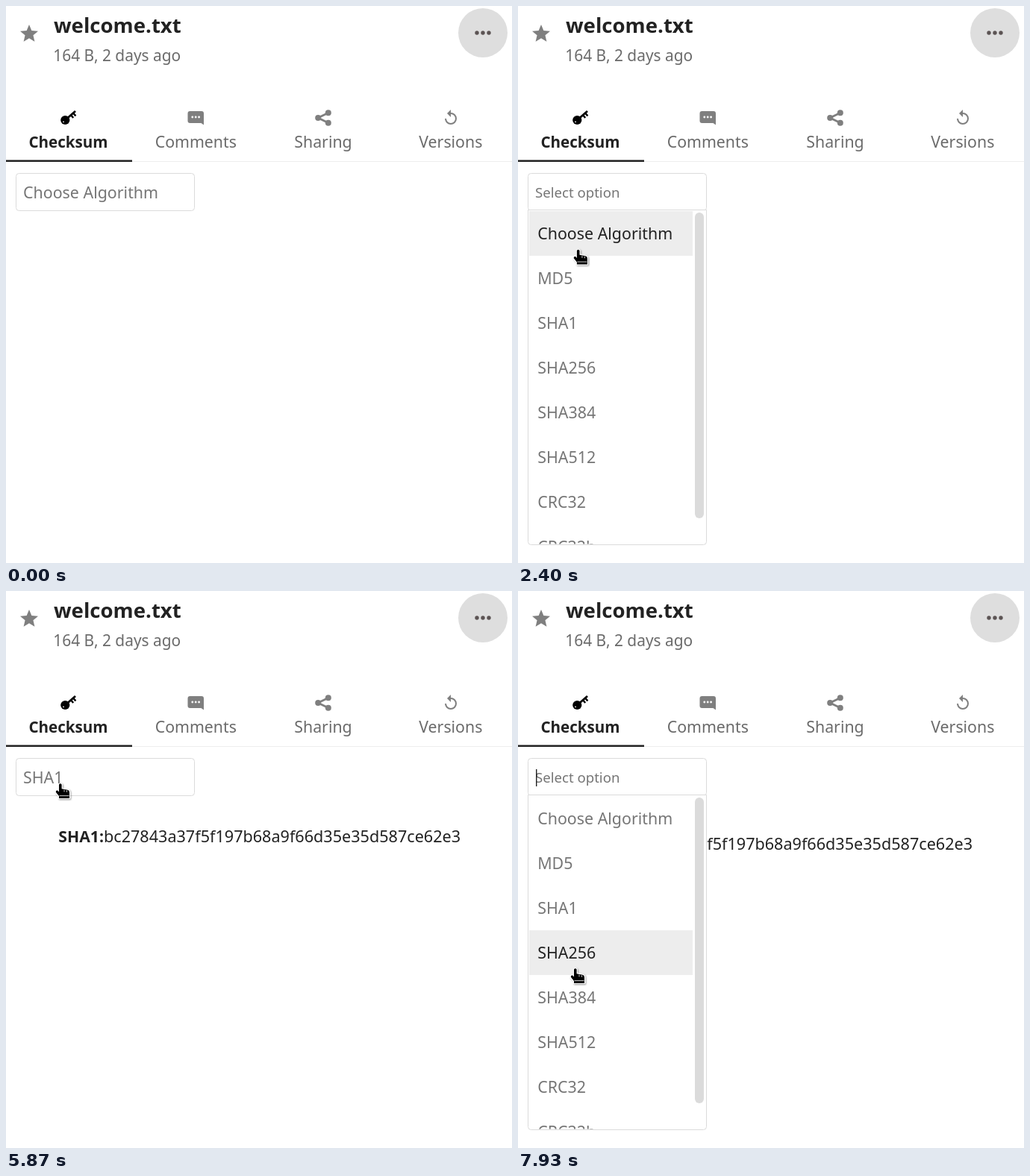
An HTML page for the animation above (8 s loop, 678 by 747 pixels).

```html
<!DOCTYPE html>
<html lang="en">
<head>
<meta charset="utf-8">
<title>Checksum panel</title>
<style>
  html, body { margin: 0; width: 100%; height: 100%; overflow: hidden; background: #fff; }
  svg { display: block; }
  text { font: 21.4px "Noto Sans", "Open Sans", sans-serif; fill: #6b6b6b; }
  .title { font-size: 27.6px; font-weight: 700; fill: #222; }
  .meta { font-size: 20.9px; }
  .tab { text-anchor: middle; font-size: 21.3px; }
  .tab.on { font-size: 20.6px; font-weight: 700; fill: #222; }
  .field { fill: #767676; }
  .hint { font-size: 18.6px; }
  #items text { fill: #767676; }
  #items text.on { fill: #222; }
  #hash text { font-size: 21.6px; fill: #222; }
  #hash .name { font-size: 21.2px; font-weight: 700; }
  .icon { fill: #7f7f7f; }
  .frame { fill: #fff; stroke: #dbdbdb; }
  #cursor path { stroke-linejoin: round; paint-order: stroke; }
  .shape { fill: #000; stroke: #fff; stroke-width: 2.2; }
</style>
</head>
<body>
<svg width="678" height="747" viewBox="0 0 678 747">
  <defs>
    <clipPath id="listClip"><rect x="14" y="274" width="238" height="447.5"/></clipPath>
    <filter id="shade" x="-50%" y="-50%" width="200%" height="200%">
      <feDropShadow dx="1" dy="1" stdDeviation=".9" flood-opacity=".45"/>
    </filter>
  </defs>

  <path class="icon" transform="translate(16.6 22.6) scale(1.2)"
    d="M12 17.27 18.18 21l-1.64-7.03L22 9.24l-7.19-.61L12 2 9.19 8.63 2 9.24l5.46 4.73L5.82 21z"/>
  <text class="title" x="64" y="36">welcome.txt</text>
  <text class="meta" x="63.3" y="74">164 B, 2 days ago</text>
  <circle cx="639" cy="36" r="33" fill="#dedede"/>
  <g fill="#5c5454">
    <circle cx="631" cy="36" r="2.7"/><circle cx="639" cy="36" r="2.7"/><circle cx="647" cy="36" r="2.7"/>
  </g>

  <g fill="none" stroke="#000">
    <circle cx="79.3" cy="153" r="6.1" fill="#000" stroke="none"/>
    <path d="M81 151.5 93 141" stroke-width="2.8"/>
    <path d="M87.2 146.5 90.2 150M90.2 143.8 93.4 147.4" stroke-width="2.4"/>
    <circle cx="77" cy="155.3" r=".9" fill="#fff" stroke="none"/>
  </g>
  <path class="icon" d="M246.5 141H262a3 3 0 0 1 3 3V159.5L261.5 157H246.5a3 3 0 0 1-3-3V144a3 3 0 0 1 3-3Z"/>
  <g fill="#fff">
    <circle cx="249.8" cy="149" r="1.4"/><circle cx="254.2" cy="149" r="1.4"/><circle cx="258.6" cy="149" r="1.4"/>
  </g>
  <g class="icon">
    <path d="M432 143.3 418 150 432 156.7" fill="none" stroke="#7f7f7f" stroke-width="2.8"/>
    <circle cx="418.2" cy="150" r="4"/><circle cx="431.8" cy="143.3" r="4"/><circle cx="431.8" cy="156.7" r="4"/>
  </g>
  <path class="icon" transform="translate(584 138)" d="M12 5V1L7 6l5 5V7a6 6 0 1 1-6 6H4a8 8 0 1 0 8-8z"/>

  <text class="tab on" x="83.5" y="190">Checksum</text>
  <text class="tab" x="254.3" y="190">Comments</text>
  <text class="tab" x="425" y="190">Sharing</text>
  <text class="tab" x="595.8" y="190">Versions</text>
  <rect y="208" width="678" height="1" fill="#ededed"/>
  <rect y="206.5" width="169" height="2.5" fill="#222"/>

  <g id="hash">
    <text class="name" x="70.3" y="337">SHA1:</text>
    <text x="131" y="337">bc27843a37f5f197b68a9f66d35e35d587ce62e3</text>
  </g>

  <rect class="frame" x="13.5" y="224.5" width="239" height="50" rx="4"/>
  <text id="value" x="23" y="258"></text>

  <g id="list">
    <path class="frame" d="M13.5 273.5H252.5V718.5a4 4 0 0 1-4 4H17.5a4 4 0 0 1-4-4Z"/>
    <rect id="mark" x="15" width="219" height="60" fill="#ededed"/>
    <g id="items" clip-path="url(#listClip)"></g>
    <rect x="237" y="277" width="12" height="410" rx="6" fill="#dbdbdb"/>
  </g>
  <rect id="caret" x="24" y="239" width="1.4" height="23" fill="#222"/>

  <g id="cursor" filter="url(#shade)">
    <path id="arrow" class="shape" d="M.5.5V20L5 16.2 8.3 23.6 11.2 22.3 8 15.2H13.8Z"/>
    <g id="hand">
      <path class="shape" d="M-2 1.5Q-.2-1 1.6 1.5V7.2L9.5 8.8Q12 9.4 12 12V20H-2V17L-6.2 11.8Q-6.4 8.8-3.8 9.6L-2 11.4Z"/>
      <path d="M-1.5 16.6H11.5M5 8.6V11.4M8.5 9.3V11.8" fill="none" stroke="#fff" stroke-width=".8"/>
    </g>
    <path id="beam" class="shape" d="M-4-10H-1L0-9 1-10H4V-8H1V8H4V10H1L0 9-1 10H-4V8H-1V-8H-4Z"/>
  </g>
</svg>
<script>
const $ = id => document.getElementById(id);
const LOOP = 8000, STEP = 1000 / 15;
const names = ["Choose Algorithm", "MD5", "SHA1", "SHA256", "SHA384", "SHA512", "CRC32", "CRC32b"];

const items = names.map((name, i) => {
  const el = document.createElementNS("http://www.w3.org/2000/svg", "text");
  el.textContent = name;
  el.setAttribute("x", 26.2);
  el.setAttribute("y", 313 + 60 * i);
  $("items").append(el);
  return el;
});

// pointer path: tick, x, y
const path = [
  [9, 0, 312], [19, 85, 253], [23, 85, 256], [30, 85, 256], [43, 76, 412],
  [44, 74, 402], [45, 75, 396], [47, 77, 408], [53, 77, 408], [54, 76, 407],
  [75, 76, 407], [88, 73, 258], [105, 73, 258], [107, 72, 298], [118, 76, 491], [119, 77, 506]
];

function pointer(k) {
  const i = path.findIndex(p => p[0] > k);
  if (i < 0) return path[path.length - 1].slice(1);
  const [k0, x0, y0] = path[Math.max(i - 1, 0)], [k1, x1, y1] = path[i];
  const u = Math.max(0, (k - k0) / (k1 - k0));
  // long travels start and stop gently
  const e = k1 - k0 > 9 && k < 100 ? u * .5 + u * u * (3 - 2 * u) * .5 : u;
  return [x0 + (x1 - x0) * e, y0 + (y1 - y0) * e];
}

const show = (id, on) => $(id).setAttribute("visibility", on ? "visible" : "hidden");
const within = (k, a, b) => k >= a && k < b;

function draw(ms) {
  const k = Math.floor((ms % LOOP + 5) / STEP) % 120;
  const [x, y] = pointer(k);
  const open = within(k, 23, 52) || k >= 95;
  const fade = within(k, 52, 54) ? (54 - k) / 3 : 0;
  const row = Math.max(0, Math.floor((y - 275) / 60));

  $("value").textContent = open ? "Select option" : k < 23 ? names[0] : "SHA1";
  $("value").setAttribute("class", open ? "field hint" : "field");
  $("value").setAttribute("y", open ? 257 : 258);
  $("list").setAttribute("opacity", open ? 1 : fade);
  $("mark").setAttribute("y", 275 + 60 * row);
  items.forEach((el, i) => el.classList.toggle("on", i === row));
  show("caret", open && !within(k, 32, 41) && !within(k, 104, 113));

  show("hash", k >= 63);
  $("hash").setAttribute("transform", `translate(0 ${k >= 95 ? 10 : 0})`);

  const shape = k < 9 ? "" : open && y < 274 ? "beam" : open || fade || y < 274 ? "hand" : "arrow";
  for (const id of ["arrow", "hand", "beam"]) show(id, id === shape);
  $("cursor").setAttribute("transform", `translate(${x.toFixed(1)} ${y.toFixed(1)})`);
}

function tick() {
  draw(performance.now());
  requestAnimationFrame(tick);
}
tick();
</script>
</body>
</html>
```
